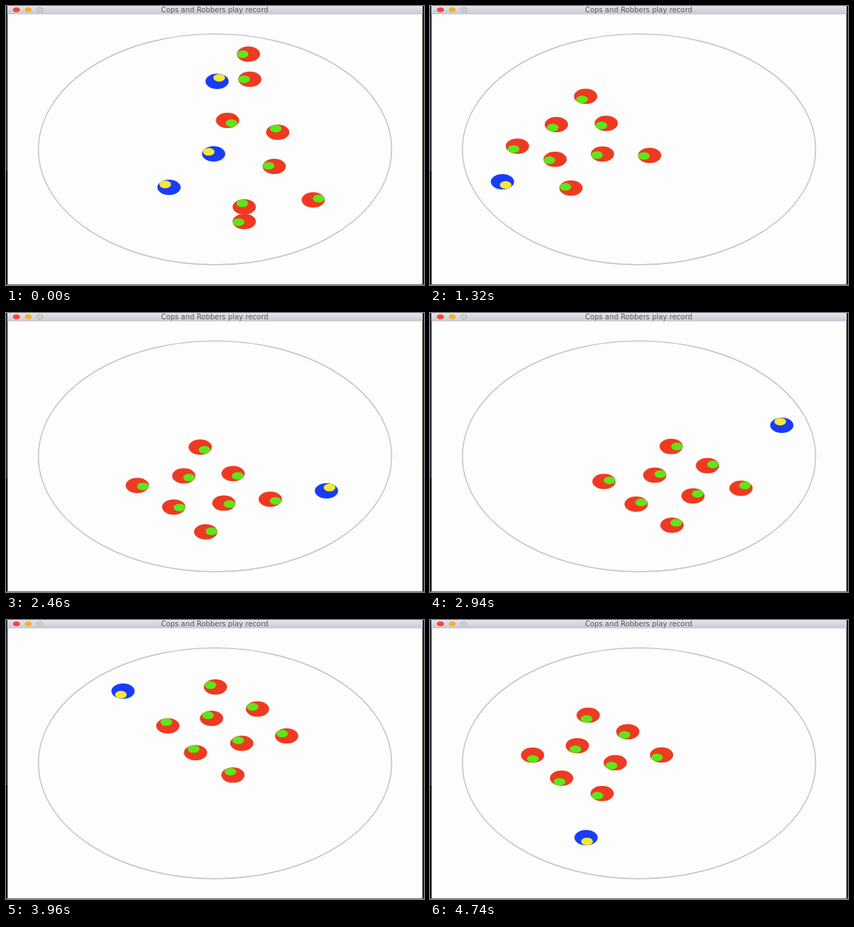
Recreate the animation shown at these times as an HTML page with a canvas. Size 600 by 400 pixels, loop 4.8 s.

```html
<!DOCTYPE html>
<html lang="en">
<head>
<meta charset="utf-8">
<title>Cops and Robbers play record</title>
<style>
  html, body { margin: 0; width: 100%; height: 100%; overflow: hidden; }
  canvas { display: block; width: 600px; height: 400px; }
</style>
</head>
<body>
<canvas id="stage" width="600" height="400"></canvas>
<script>
const ctx = document.getElementById('stage').getContext('2d');
const LOOP = 4800, STEP = 60;
const ASPECT = 1.53; // the view is wider than the round arena
const BODY = { x: 16.7, y: 11 }, EYE = { x: 8.4, y: 5.5 };
const COP = ['#ee3a22', '#5ee619'], ROBBER = ['#1a3cf8', '#f2ea30'];

// Cops chase the nearest robber, keep apart and drift as one flock.
const SPEED = 6, TURN = 0.25, SPACING = 47, PUSH = 0.3;

// Routes are [time, x, y]; a robber is caught when its route ends.
const robbers = [
  [[0, 303, 108], [120, 315, 88]],
  [[0, 234, 260], [330, 150, 196], [540, 75, 193], [660, 97, 205], [900, 165, 205]],
  [[0, 298, 212], [330, 222, 180], [660, 136, 202], [930, 85, 232],
   [1320, 104, 252], [1620, 190, 335], [1980, 332, 344], [2460, 460, 255],
   [2940, 505, 161], [3420, 375, 60], [3960, 168, 102], [4740, 224, 312]]
];
const flockRoute = [[0, 364.5, 203], [660, 292, 194], [1320, 216, 197],
  [1980, 212, 244], [2940, 348, 247], [3960, 316, 159], [4740, 238, 193]];

const cop = (x, y, degrees) => ({ x: x / ASPECT, y, heading: degrees * Math.PI / 180 });
const startingCops = [
  cop(348, 69, 180), cop(350, 105, 180), cop(318, 164, 46), cop(390, 181, 250),
  cop(385, 230, 188), cop(441, 278, 340), cop(342, 288, 250), cop(342, 309, 170)
];

// Smooth path through the route, in arena units, with its direction.
function follow(route, t) {
  const last = route.length - 1;
  const i = Math.max(1, route.findIndex(point => point[0] >= t));
  const span = route[i][0] - route[i - 1][0];
  const u = (t - route[i - 1][0]) / span, v = 1 - u;

  const slope = (k, axis) => {
    const a = route[Math.max(0, k - 1)], b = route[Math.min(last, k + 1)];
    return (b[axis] - a[axis]) / (b[0] - a[0]) * span;
  };
  const along = axis => {
    const a = route[i - 1][axis], b = route[i][axis];
    const da = slope(i - 1, axis), db = slope(i, axis);
    return {
      at: v * v * ((1 + 2 * u) * a + u * da) + u * u * ((3 - 2 * u) * b - v * db),
      rate: 6 * u * v * (b - a) + v * (1 - 3 * u) * da + u * (3 * u - 2) * db
    };
  };
  const x = along(1), y = along(2);
  return { x: x.at / ASPECT, y: y.at, heading: Math.atan2(y.rate, x.rate / ASPECT) };
}

const robbersAt = t => robbers
  .filter(route => t <= route[route.length - 1][0])
  .map(route => follow(route, t));

const distance = (a, b) => Math.hypot(b.x - a.x, b.y - a.y);
const mean = (list, axis) => list.reduce((sum, item) => sum + item[axis], 0) / list.length;

function chase(cops, t) {
  const targets = robbersAt(t);
  const moved = cops.map(c => {
    const prey = targets.reduce((a, b) => distance(c, b) < distance(c, a) ? b : a);
    const miss = Math.atan2(prey.y - c.y, prey.x - c.x) - c.heading;
    const heading = c.heading + TURN * Math.atan2(Math.sin(miss), Math.cos(miss));
    return {
      x: c.x + SPEED * Math.cos(heading),
      y: c.y + SPEED * Math.sin(heading),
      heading
    };
  });

  moved.forEach((a, i) => moved.slice(i + 1).forEach(b => {
    const gap = distance(a, b);
    const push = PUSH * Math.max(0, SPACING - gap) / gap;
    const dx = (b.x - a.x) * push, dy = (b.y - a.y) * push;
    a.x -= dx; a.y -= dy;
    b.x += dx; b.y += dy;
  }));

  const centre = follow(flockRoute, t);
  const dx = centre.x - mean(moved, 'x'), dy = centre.y - mean(moved, 'y');
  return moved.map(c => ({ x: c.x + dx, y: c.y + dy, heading: c.heading }));
}

const copsByStep = [startingCops];
for (let t = STEP; t < LOOP; t += STEP) {
  copsByStep.push(chase(copsByStep[copsByStep.length - 1], t));
}

function oval(x, y, rx, ry, fill) {
  ctx.beginPath();
  ctx.ellipse(x, y, rx, ry, 0, 0, Math.PI * 2);
  if (fill) {
    ctx.fillStyle = fill;
    ctx.fill();
  }
}

function outline(color, width) {
  ctx.strokeStyle = color;
  ctx.lineWidth = width;
  ctx.stroke();
}

function rect(x, y, w, h, fill) {
  ctx.fillStyle = fill;
  ctx.fillRect(x, y, w, h);
}

function drawWindow() {
  rect(0, 0, 600, 400, '#fdfdfd');
  const bar = ctx.createLinearGradient(0, 0, 0, 12);
  bar.addColorStop(0, '#e4e4ec');
  bar.addColorStop(1, '#c9c9d2');
  rect(0, 0, 600, 12, bar);

  rect(0, 0, 2, 237, '#2c323c');
  rect(0, 237, 2, 163, '#14110e');
  rect(2, 12, 1, 388, '#a8a8a8');
  rect(597, 12, 1, 388, '#a8a8a8');
  rect(598, 0, 2, 400, '#241e1c');
  rect(0, 399, 600, 1, '#6a6058');

  oval(15, 5.5, 5.2, 3.5, '#f4473c');
  oval(32, 5.5, 5.2, 3.5, '#f4b22c');
  oval(48.5, 5.5, 5, 3.3, '#cbcbd2');
  outline('#b2b2ba', 0.8);

  ctx.fillStyle = '#55555a';
  ctx.font = '10.25px "DejaVu Sans", sans-serif';
  ctx.textAlign = 'center';
  ctx.fillText('Cops and Robbers play record', 299.5, 9);

  oval(300, 205.5, 253.5, 165.5);
  outline('#c4c4d2', 1.6);
}

function drawPlayer({ x, y, heading }, [body, eye]) {
  oval(x * ASPECT, y, BODY.x, BODY.y, body);
  oval(x * ASPECT + Math.cos(heading) * (BODY.x - EYE.x),
       y + Math.sin(heading) * (BODY.y - EYE.y), EYE.x, EYE.y, eye);
}

const start = performance.now();
function draw() {
  const step = Math.floor((performance.now() - start) % LOOP / STEP);
  // The last route point is one step before the loop restarts.
  const t = step * STEP;
  drawWindow();
  copsByStep[step].forEach(c => drawPlayer(c, COP));
  robbersAt(t).forEach(r => drawPlayer(r, ROBBER));
  requestAnimationFrame(draw);
}
draw();
</script>
</body>
</html>
```
